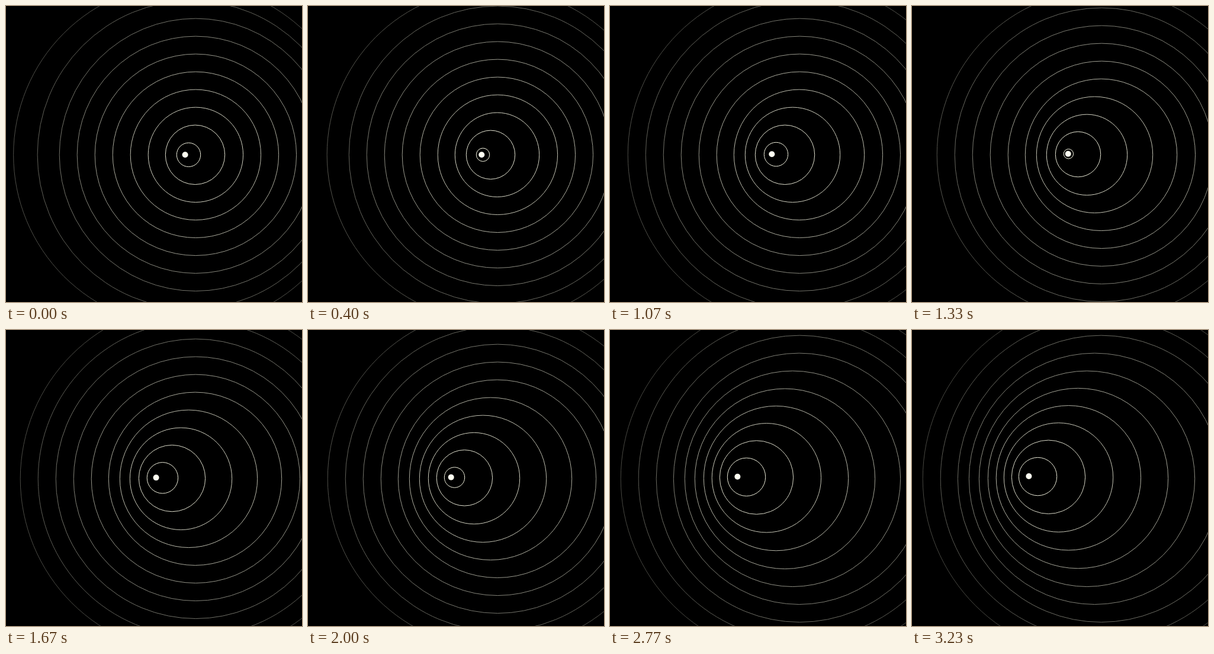
Recreate the animation shown at these times as an HTML page with a canvas. Size 500 by 500 pixels, loop 3.26 s.

```html
<!DOCTYPE html>
<html lang="en">
<head>
<meta charset="utf-8">
<title>Moving wave emitter</title>
<style>
  html, body { margin: 0; width: 100%; height: 100%; overflow: hidden; background: #000; }
  canvas { display: block; width: 500px; height: 500px; }
</style>
</head>
<body>
<canvas id="stage" width="500" height="500"></canvas>
<script>
const ctx = document.getElementById('stage').getContext('2d');

const LOOP = 3260;      // ms
const STEP = 50;        // ms per simulation step
const DELAY = 25;       // ms before the first step counts
const PERIOD = 10;      // steps between two rings
const FIRST = -94;      // step at which the oldest ring was emitted
const START_R = 8.2, GROWTH = 3, MAX_R = 306;

// Emitter path, one point per emitted ring
const pathX = [302.8, 313.3, 320.4, 320.4, 320.4, 320.4, 320.4, 320.4, 319.5,
               308.5, 295.5, 280.5, 264.4, 247.5, 230.5, 212.5, 194.5];
const pathY = pathX.map((x, i) => 251.3 - 0.75 * Math.max(0, i - 10));

function emitterAt(step) {
  const p = (step - FIRST) / PERIOD;
  const i = Math.min(Math.floor(p), pathX.length - 2);
  const mix = a => a[i] + (a[i + 1] - a[i]) * (p - i);
  return [mix(pathX), mix(pathY)];
}

function ringColor(r) {
  const light = Math.round(255 * (1 - r / 420));
  return `rgb(${light},${light},${Math.round(light * 0.92)})`;
}

function circle(x, y, r) {
  ctx.beginPath();
  ctx.arc(x, y, r, 0, Math.PI * 2);
}

function draw(t) {
  const step = Math.max(0, Math.floor((t - DELAY) / STEP));
  ctx.fillStyle = '#000';
  ctx.fillRect(0, 0, 500, 500);

  ctx.lineWidth = 1;
  pathX.forEach((x, i) => {
    const age = step - (FIRST + i * PERIOD);
    const r = START_R + GROWTH * age;
    if (age < 0 || r > MAX_R) return;
    ctx.strokeStyle = ringColor(r);
    circle(x, pathY[i], r);
    ctx.stroke();
  });

  const [x, y] = emitterAt(step);
  ctx.fillStyle = '#fffff2';
  circle(x - 0.7, y, 5);
  ctx.fill();
}

const begin = performance.now();
function tick() {
  draw((performance.now() - begin) % LOOP);
  requestAnimationFrame(tick);
}
tick();
</script>
</body>
</html>
```
